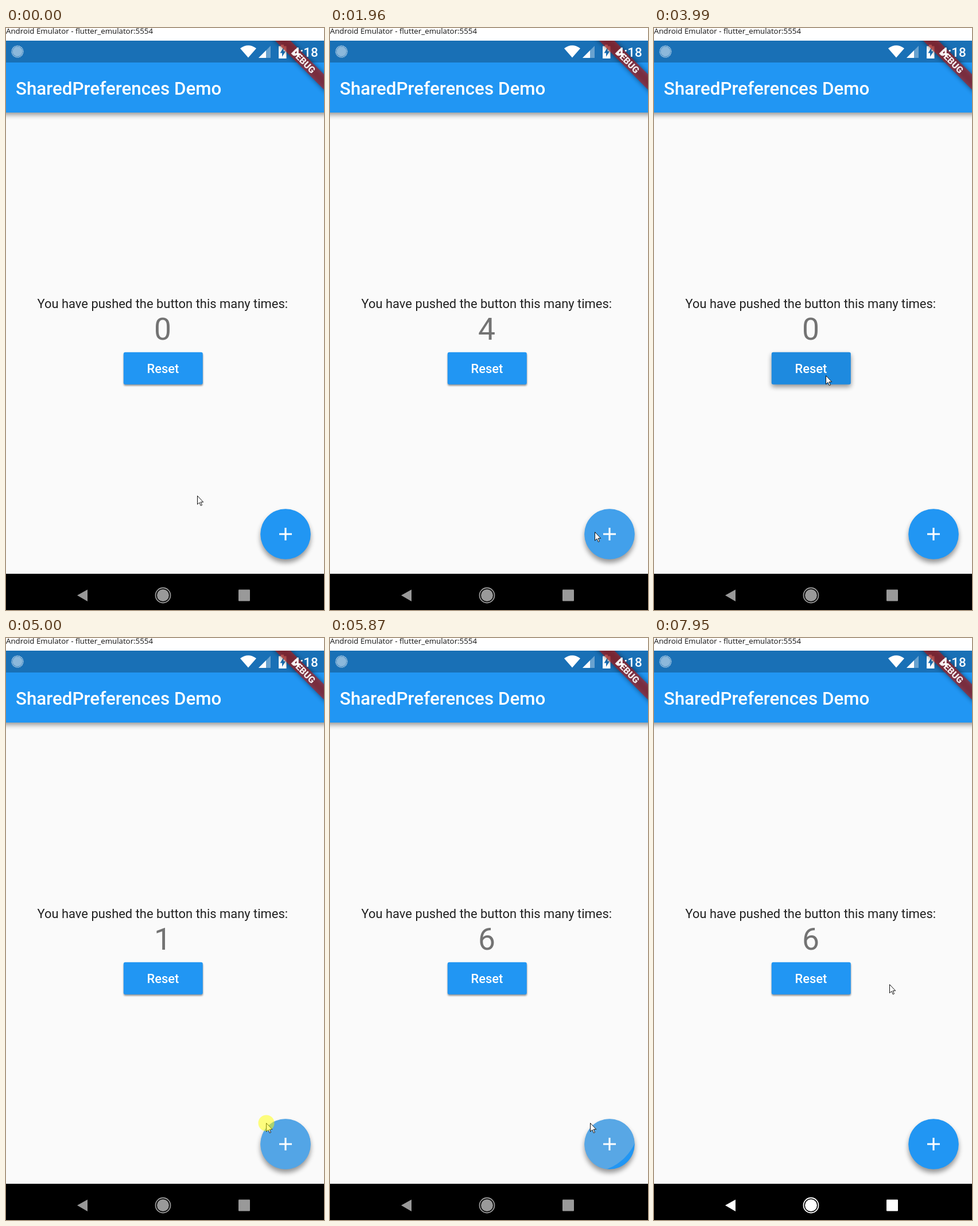
An HTML page that plays this animation: 554 by 1012 pixels, repeating every 8 s.

```html
<!DOCTYPE html>
<html lang="en">
<head>
<meta charset="utf-8">
<title>Counter demo</title>
<style>
  html, body { margin: 0; width: 100%; height: 100%; overflow: hidden; background: #fafafa; }
  svg { display: block; font-family: Roboto, sans-serif; }
  .medium { font-weight: 500; fill: #fff; }
  .mid { text-anchor: middle; }
</style>
</head>
<body>
<svg width="554" height="1012" viewBox="0 0 554 1012">
  <defs>
    <clipPath id="fabClip"><circle cx="487" cy="880" r="43.800"/></clipPath>
    <clipPath id="btnClip"><rect x="204.800" y="563.800" width="138" height="56" rx="3"/></clipPath>
    <filter id="soft" x="-30%" y="-60%" width="160%" height="220%"><feGaussianBlur stdDeviation="4"/></filter>
    <filter id="tight" x="-20%" y="-40%" width="140%" height="180%"><feGaussianBlur stdDeviation="1.8"/></filter>
  </defs>

  <rect width="554" height="1012" fill="#fafafa"/>

  <!-- app bar -->
  <rect x="-20" y="60" width="594" height="91" filter="url(#soft)" opacity=".4"/>
  <rect y="22" width="554" height="125" fill="#2196f3"/>
  <rect y="22" width="554" height="38" fill="#1970b6"/>
  <rect width="554" height="22" fill="#fff"/>
  <text y="10" font-size="13.3" font-family="Open Sans, sans-serif" fill="#111">Android Emulator - flutter_emulator:5554</text>
  <text class="medium" x="17" y="115.500" font-size="31.350">SharedPreferences Demo</text>

  <!-- status icons -->
  <circle cx="20" cy="41" r="8.500" fill="#fff" opacity=".5"/>
  <circle cx="20" cy="41" r="9.700" fill="none" stroke="#fff" stroke-width="2" stroke-dasharray="1.500 1" opacity=".7"/>
  <g fill="#fff">
    <path d="M408 35.500Q422 25 436 35.500L422 51.500Z"/>
    <path d="M461 31V52H440Z" opacity=".35"/>
    <path d="M453 39V52H440Z"/>
    <path d="M479 29h5v2.500h4.500V53h-13.500V31.500h4Z"/>
    <path d="M483.500 34l-6 9.500h3.500v6.500l6-9.500h-3.500Z" fill="#1970b6"/>
  </g>

  <!-- corner banner -->
  <svg y="22" width="554" height="130">
    <g transform="translate(554 0) rotate(45)">
      <rect x="-90" y="41.300" width="180" height="18.900" filter="url(#soft)" opacity=".5"/>
      <rect x="-90" y="41.300" width="180" height="18.900" fill="#b71c1c" opacity=".63"/>
      <text class="mid" y="56.300" font-size="16" font-weight="900" fill="#fff" opacity=".9">DEBUG</text>
    </g>
  </svg>
  <text class="medium" x="499.500" y="50" font-size="22.500">4:18</text>

  <!-- body -->
  <text class="mid" x="272.800" y="487" font-size="21.950" fill="#212121">You have pushed the button this many times:</text>
  <text class="mid" id="count" x="273" y="542" font-size="53.400" fill="#737373">0</text>
  <rect id="btnShadow" x="205" y="566" width="138" height="56" rx="3" filter="url(#tight)" opacity=".42"/>
  <rect x="204.800" y="563.800" width="138" height="56" rx="3" fill="#2196f3"/>
  <g clip-path="url(#btnClip)"><circle id="btnRipple" cx="300" cy="604"/></g>
  <text class="medium mid" x="273.500" y="600" font-size="21.950">Reset</text>

  <!-- floating button -->
  <circle cx="487" cy="886" r="43.800" filter="url(#soft)" opacity=".4"/>
  <circle cx="487" cy="880" r="43.800" fill="#2196f3"/>
  <g id="ripples" clip-path="url(#fabClip)" fill="#c8c8c8"></g>
  <path d="M476 880h22M487 869v22" stroke="#fff" stroke-width="3.100"/>

  <!-- navigation bar -->
  <rect y="949" width="554" height="63"/>
  <g id="nav" fill="#999" stroke="#999">
    <path d="M124 986.500L142 976.500V997Z" stroke="none"/>
    <circle cx="273.500" cy="986.500" r="13" fill="none" stroke-width="1.800"/>
    <circle cx="273.500" cy="986.500" r="10.500" stroke="none"/>
    <rect x="405" y="976.500" width="20" height="20" rx="1" stroke="none"/>
  </g>

  <g id="cursor">
    <path d="M.5 .5V15.300L3.900 12.100 6.300 17.600 8.500 16.600 6.100 11.300H10.700Z" fill="#fff" stroke="#111"/>
    <circle id="press" cx=".5" cy=".5" r="14" fill="#ff0" opacity=".5"/>
  </g>
</svg>
<script>
const $ = id => document.getElementById(id);
const LOOP = 8000, STEP = 78.1, RESET = 3910, PRESS = 70, FADE = 320;

const run = (first, n, gap) => Array.from({ length: n }, (_, i) => first + i * gap);
const clicks = [...run(1410, 4, 105), ...run(2035, 5, 115), 3030, ...run(4824, 6, 175)];

// pointer moves: [from, to, x, y]
const home = [333, 813];
const moves = [
  [430, 1010, 462, 909], [1010, 1250, 461, 876],
  [3120, 3690, 299, 604], [4230, 4740, 453, 843],
  [6500, 7330, 487, 992], [7400, 7640, 331, 949], [7720, 7950, 410, 602]
];

const clamp = v => Math.max(0, Math.min(1, v));
const mix = (a, b, k) => a + (b - a) * k;
const smooth = k => k * k * (3 - 2 * k);
const set = (el, attrs) => { for (const k in attrs) el.setAttribute(k, attrs[k]); };

const ripples = clicks.map(() =>
  $('ripples').appendChild(document.createElementNS('http://www.w3.org/2000/svg', 'circle')));

const pointer = t => moves.reduce(([x, y], [from, to, nx, ny]) => {
  const k = smooth(clamp((t - from) / (to - from)));
  return [mix(x, nx, k), mix(y, ny, k)];
}, home).map(Math.round);

function drawRipple(el, age, strength) {
  const on = age > 0 && age < FADE;
  set(el, {
    r: on ? age * 0.54 : 0,
    opacity: on ? strength * clamp(2 - 2 * age / FADE) : 0
  });
}

function draw(t) {
  const [x, y] = pointer(t);
  const pressed = [...clicks, RESET].some(c => t >= c - PRESS && t < c);
  set($('cursor'), { transform: `translate(${x} ${y})` });
  set($('press'), { visibility: pressed ? 'visible' : 'hidden' });

  $('count').textContent = clicks.filter(c => c <= t && (t < RESET || c > RESET)).length;

  ripples.forEach((el, i) => {
    const [cx, cy] = pointer(clicks[i]);
    set(el, { cx, cy });
    drawRipple(el, t - clicks[i], 0.33);
  });

  drawRipple($('btnRipple'), t - RESET + 125, 0.11);
  const lifted = t >= RESET - PRESS && t < RESET + 240;
  set($('btnShadow'), { y: lifted ? 568 : 566, filter: lifted ? 'url(#soft)' : 'url(#tight)' });

  const grey = Math.round(mix(153, 255, clamp((t - 7710) / 240)));
  set($('nav'), { fill: `rgb(${grey},${grey},${grey})`, stroke: `rgb(${grey},${grey},${grey})` });
}

// the screen refreshes at a fixed, slow rate
const refresh = t => Math.floor((t + 20) / STEP) * STEP;

const start = performance.now();
function tick() {
  draw(refresh((performance.now() - start) % LOOP));
  requestAnimationFrame(tick);
}
tick();
</script>
</body>
</html>
```
